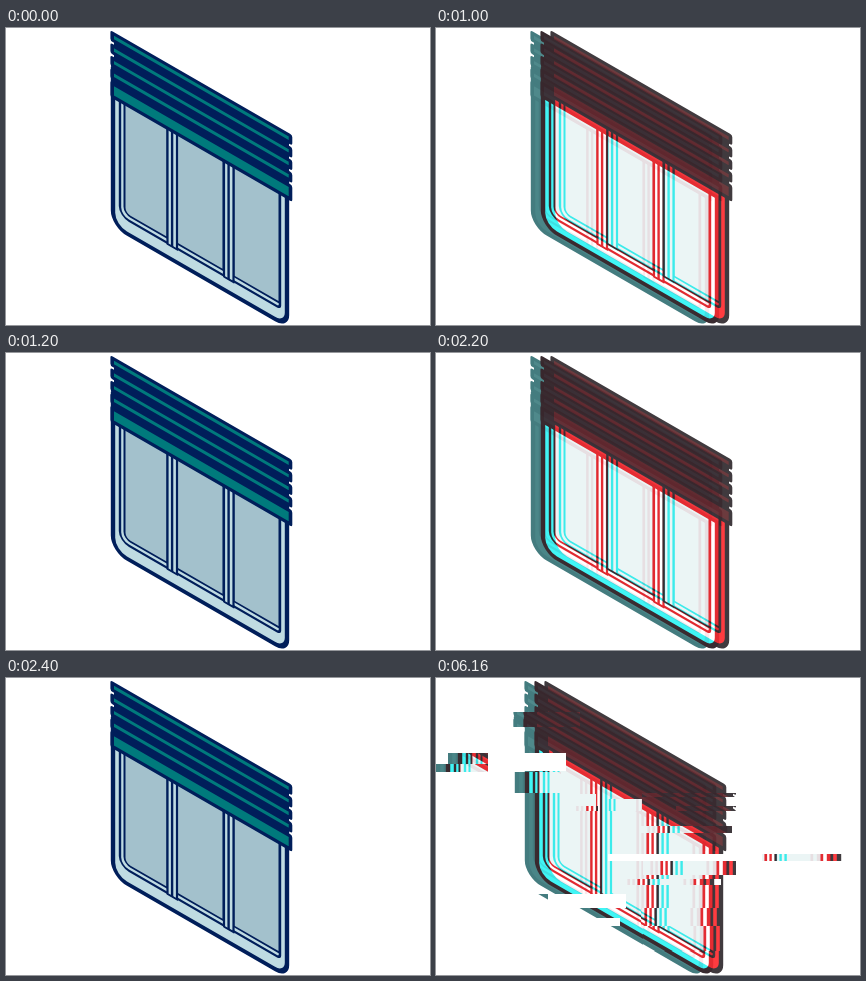
These frames come from a looping animation (424 px wide and 297 px high, 8000 ms). An HTML page with a canvas:

```html
<!DOCTYPE html>
<html lang="en">
<head>
<meta charset="utf-8">
<title>Window glitch</title>
<style>
html, body { margin: 0; width: 100%; height: 100%; overflow: hidden; background: #fff; }
canvas { display: block; }
</style>
</head>
<body>
<canvas id="stage" width="424" height="297"></canvas>
<script>
const W = 424, H = 297, SLOPE = 0.577;

function makeCanvas(paint) {
  const canvas = document.createElement('canvas');
  canvas.width = W;
  canvas.height = H;
  paint(canvas.getContext('2d'));
  return canvas;
}

// Isometric window with blind, moved sideways by dx
function drawWindow(c, dx, { line, frame, glass, slat }) {
  const box = (x, y, w, h, radii, fill, width) => {
    c.beginPath();
    c.roundRect(x, y, w, h, radii);
    c.fillStyle = fill;
    c.fill();
    c.lineWidth = width;
    c.stroke();
  };
  c.save();
  c.setTransform(1, SLOPE, 0, 1, dx, -SLOPE * 106);
  c.strokeStyle = line;
  c.lineJoin = 'round';
  box(107, 40, 174, 157, [0, 0, 12, 14], frame, 4.4);
  box(114, 40, 160, 143, [0, 0, 3, 9], frame, 2.4);
  box(118.5, 40, 43, 138, [0, 0, 0, 6], glass, 2);
  box(170.5, 40, 47, 138, 0, glass, 2);
  box(227.5, 40, 46, 138, 0, glass, 2);
  for (const x of [161.5, 218]) {
    box(x, 40, 9.5, 144, 0, frame, 2.2);
    c.fillStyle = line;
    c.fillRect(x + 3.4, 40, 2.4, 144);
  }
  c.fillStyle = line;
  c.fillRect(108, 4, 175, 64);
  for (let i = 0; i < 5; i++) {
    box(106.2, 4.8 + i * 12.6, 178.3, i < 4 ? 7 : 13, 0.5, slat, 3.6);
  }
  c.restore();
}

const flat = color => ({ line: color, frame: color, glass: color, slat: color });

const clean = makeCanvas(c => drawWindow(c, 0, {
  line: '#001e5a', frame: '#bfdbe2', glass: '#a3c1cc', slat: '#007a7c'
}));

// Colour channels pulled apart sideways
const split = makeCanvas(c => {
  const channel = (back, dx, colors) => {
    c.drawImage(makeCanvas(layer => {
      layer.fillStyle = back;
      layer.fillRect(0, 0, W, H);
      drawWindow(layer, dx, colors);
    }), 0, 0);
  };
  c.fillStyle = '#fff';
  c.fillRect(0, 0, W, H);
  c.globalCompositeOperation = 'multiply';
  channel('#fff', -10, { line: '#fbe8ec', frame: '#fff', glass: '#fff', slat: '#fff' });
  channel('#ff3c40', 0, { line: '#e42c32', frame: '#fff', glass: '#ebf5f5', slat: '#f0363c' });
  channel('#40f5f5', 10, { line: '#40f5f5', frame: '#fff', glass: '#fff', slat: '#6cf8f8' });
  c.globalCompositeOperation = 'destination-in';
  c.drawImage(makeCanvas(mask => {
    drawWindow(mask, 0, flat('#000'));
    drawWindow(mask, 10, flat('#000'));
  }), 0, 0);
  c.globalCompositeOperation = 'destination-over';
  c.drawImage(makeCanvas(back => drawWindow(back, -10, {
    line: '#447c7f', frame: '#4a8688', glass: '#4a8688', slat: '#4f898b'
  })), 0, 0);
});

// x, y, width, height, source x (none = blank)
const blocks = [
  [76, 34, 68, 15, 93],
  [52, 75, 78, 18],
  [12, 75, 40, 11, 95],
  [0, 86, 52, 8, 95],
  [78, 94, 47, 21, 94],
  [140, 116, 20, 12, 130],
  [140, 128, 22, 5, 150],
  [172, 121, 34, 12, 122],
  [206, 115, 94, 4, 202],
  [240, 128, 60, 5, 236],
  [204, 148, 92, 7, 199],
  [172, 176, 154, 7],
  [326, 176, 98, 7, 214],
  [207, 183, 93, 14, 199],
  [190, 201, 95, 6, 205],
  [70, 216, 42, 14, 93],
  [112, 216, 78, 14],
  [205, 230, 80, 18, 213],
  [148, 240, 36, 8],
  [207, 248, 78, 25, 212]
];

const torn = makeCanvas(c => {
  c.drawImage(split, -6, 0);
  for (const [x, y, w, h, from] of blocks) {
    c.clearRect(x, y, w, h);
    if (from !== undefined) c.drawImage(split, from, y, w, h, x, y, w, h);
  }
});

const ctx = document.getElementById('stage').getContext('2d');

function frame() {
  const t = performance.now() % 8000;
  const picture = t >= 3400 ? torn : t % 1200 >= 1000 ? split : clean;
  ctx.fillStyle = '#fff';
  ctx.fillRect(0, 0, W, H);
  ctx.drawImage(picture, 0, 0);
  requestAnimationFrame(frame);
}
frame();
</script>
</body>
</html>
```
